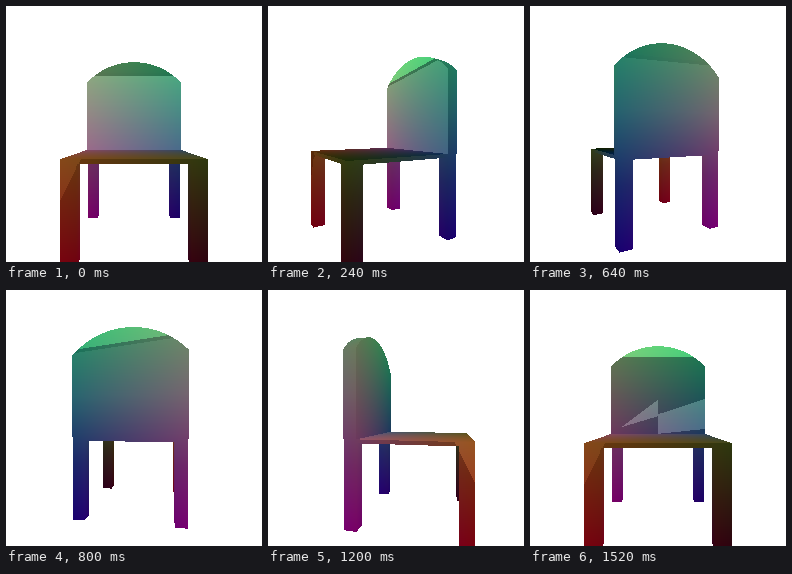
An HTML page with a canvas for the animation above (1.6 s loop, 256x256 px).

```html
<!DOCTYPE html>
<html lang="en">
<head>
<meta charset="utf-8">
<title>Turning chair</title>
<style>
  html, body { margin: 0; width: 100%; height: 100%; overflow: hidden; background: #fff; }
  canvas { display: block; width: 256px; height: 256px; image-rendering: pixelated; }
</style>
</head>
<body>
<canvas id="stage" width="256" height="256"></canvas>
<script>
const SIZE = 256, MID = 128, FOCAL = 221.7;
const STEPS = 20, STEP_MS = 80;

// Chair dimensions around the turning axis, y up
const HALF = 50.5, FRONT = -70.3, BACK = 31, THICK = 11, REST = BACK - THICK;
const FLOOR = -91.3, UNDER = -20.3, SEAT = -17.2;
const REST_HALF = 51.3, SHOULDER = 56, TOP = 78.3;

const ctx = document.getElementById('stage').getContext('2d');
const img = ctx.createImageData(SIZE, SIZE);
const nearest = new Float32Array(SIZE * SIZE);
const faces = [];

const clamp = v => Math.min(1, Math.max(0, v));

function addFace(kind, points) {
  faces.push({ kind, points });
}

// Extrude an outline in x,y between two depths
function addPrism(outline, z0, z1, front = 'body', back = 'body') {
  const at = z => outline.map(([x, y]) => [x, y, z]);
  const a = at(z0), b = at(z1);
  addFace(front, a);
  addFace(back, b);
  a.forEach((p, i) => {
    const j = (i + 1) % a.length;
    addFace('body', [p, a[j], b[j], b[i]]);
  });
}

function addBox(x0, x1, y0, y1, z0, z1) {
  addPrism([[x0, y0], [x1, y0], [x1, y1], [x0, y1]], z0, z1);
}

function restOutline() {
  const rise = TOP - SHOULDER;
  const r = (REST_HALF ** 2 + rise ** 2) / (2 * rise);
  const span = Math.asin(REST_HALF / r);
  const outline = [[-REST_HALF, SEAT], [REST_HALF, SEAT]];
  for (let i = 0; i <= 24; i++) {
    const a = span * (1 - i / 12);
    outline.push([r * Math.sin(a), TOP - r + r * Math.cos(a)]);
  }
  return outline;
}

function addSheen(...outline) {
  addFace('sheen', outline.map(([x, y]) => [x, y, REST - .2]));
}

for (const x of [-HALF, HALF - THICK]) {
  for (const z of [FRONT, REST]) addBox(x, x + THICK, FLOOR, UNDER, z, z + THICK);
}
addBox(-HALF, HALF, UNDER, SEAT, FRONT, BACK);
addFace('seat', [[-HALF, FRONT], [HALF, FRONT], [HALF, REST], [-HALF, REST]]
  .map(([x, z]) => [x, SEAT + .05, z]));
addPrism(restOutline(), REST, BACK, 'rest', 'back');
addSheen([-40, -10], [0, 20], [0, 2]);
addSheen([0, 4], [REST_HALF, 21], [REST_HALF, -12], [0, SEAT]);

function lightAt(step, turn) {
  const rest = 46 * Math.max(0, Math.cos(turn * .6));
  return {
    rest,
    body: 15 * Math.sin(turn / 2),
    seat: 30 * Math.cos(turn + 1),
    sheen: rest + 45 * (turn / (2 * Math.PI)) ** 30,
    cap: 60 * Math.cos(Math.PI * (step - 3) / 8) ** 4,
    slope: .1 * Math.sin(turn * 1.5)
  };
}

// Channel weights of each kind of light
const plain = [1, 1.1, 1], warm = [1.4, 1, .6], fresh = [.6, 1.4, .7];

function glow(kind, x, y, z, light) {
  if (kind === 'seat') return [light.seat, warm];
  if (kind === 'sheen') return [light.sheen, plain];
  if (kind === 'rest' || kind === 'back') {
    const over = y - 66 - light.slope * x;
    if (over > 0) return [light.cap, fresh];
    if (over > -3) return [0, plain];
    if (kind === 'rest') return [light.rest, plain];
  }
  // Seat light spills down the front left corner
  const corner = x + HALF + z - FRONT;
  if (corner < (y + 46) / 2) return [light.seat, warm];
  return [light.body * clamp((y + 40) / 60), plain];
}

// Base colour follows the position in the chair
function shade(kind, x, y, z, light) {
  const left = clamp((HALF - x) / (2 * HALF));
  const up = (y - FLOOR) / (TOP - FLOOR);
  const far = (z - FRONT) / (BACK - FRONT);
  const [add, tint] = glow(kind, x, y, z, light);
  return [
    45 - 20 * far + (75 + 20 * far) * left * (1 - .3 * up) + add * tint[0],
    128 * up + add * tint[1],
    15 + 97 * far * (1 - .25 * up) + add * tint[2]
  ];
}

function fillTriangle(a, b, c, kind, light) {
  const area = (b.x - a.x) * (c.y - a.y) - (b.y - a.y) * (c.x - a.x);
  if (Math.abs(area) < 1e-6) return;
  const xs = [a.x, b.x, c.x], ys = [a.y, b.y, c.y];
  const low = v => Math.max(0, Math.floor(Math.min(...v)));
  const high = v => Math.min(SIZE - 1, Math.ceil(Math.max(...v)));
  const x1 = high(xs), y1 = high(ys);
  for (let y = low(ys); y <= y1; y++) {
    for (let x = low(xs); x <= x1; x++) {
      const px = x + .5, py = y + .5;
      const u = ((b.x - px) * (c.y - py) - (b.y - py) * (c.x - px)) / area;
      const v = ((c.x - px) * (a.y - py) - (c.y - py) * (a.x - px)) / area;
      const w = 1 - u - v;
      if (u < 0 || v < 0 || w < 0) continue;
      const near = u * a.s + v * b.s + w * c.s;
      const i = y * SIZE + x;
      if (near <= nearest[i]) continue;
      nearest[i] = near;
      const at = n => (u * a.s * a.p[n] + v * b.s * b.p[n] + w * c.s * c.p[n]) / near;
      img.data.set([...shade(kind, at(0), at(1), at(2), light), 255], i * 4);
    }
  }
}

function draw(step) {
  const turn = step * 2 * Math.PI / (STEPS - 1);
  const cos = Math.cos(turn), sin = Math.sin(turn);
  const light = lightAt(step, turn);
  const project = p => {
    const s = 1 / (1 + (p[2] * cos - p[0] * sin) / FOCAL);
    return { p, s, x: MID + (p[0] * cos + p[2] * sin) * s, y: MID - p[1] * s };
  };

  nearest.fill(0);
  img.data.fill(0);
  for (const { kind, points } of faces) {
    const q = points.map(project);
    for (let i = 2; i < q.length; i++) fillTriangle(q[0], q[i - 1], q[i], kind, light);
  }
  ctx.putImageData(img, 0, 0);
}

let shown = -1;
function tick() {
  const step = Math.floor(performance.now() / STEP_MS) % STEPS;
  if (step !== shown) draw(shown = step);
  requestAnimationFrame(tick);
}
tick();
</script>
</body>
</html>
```
